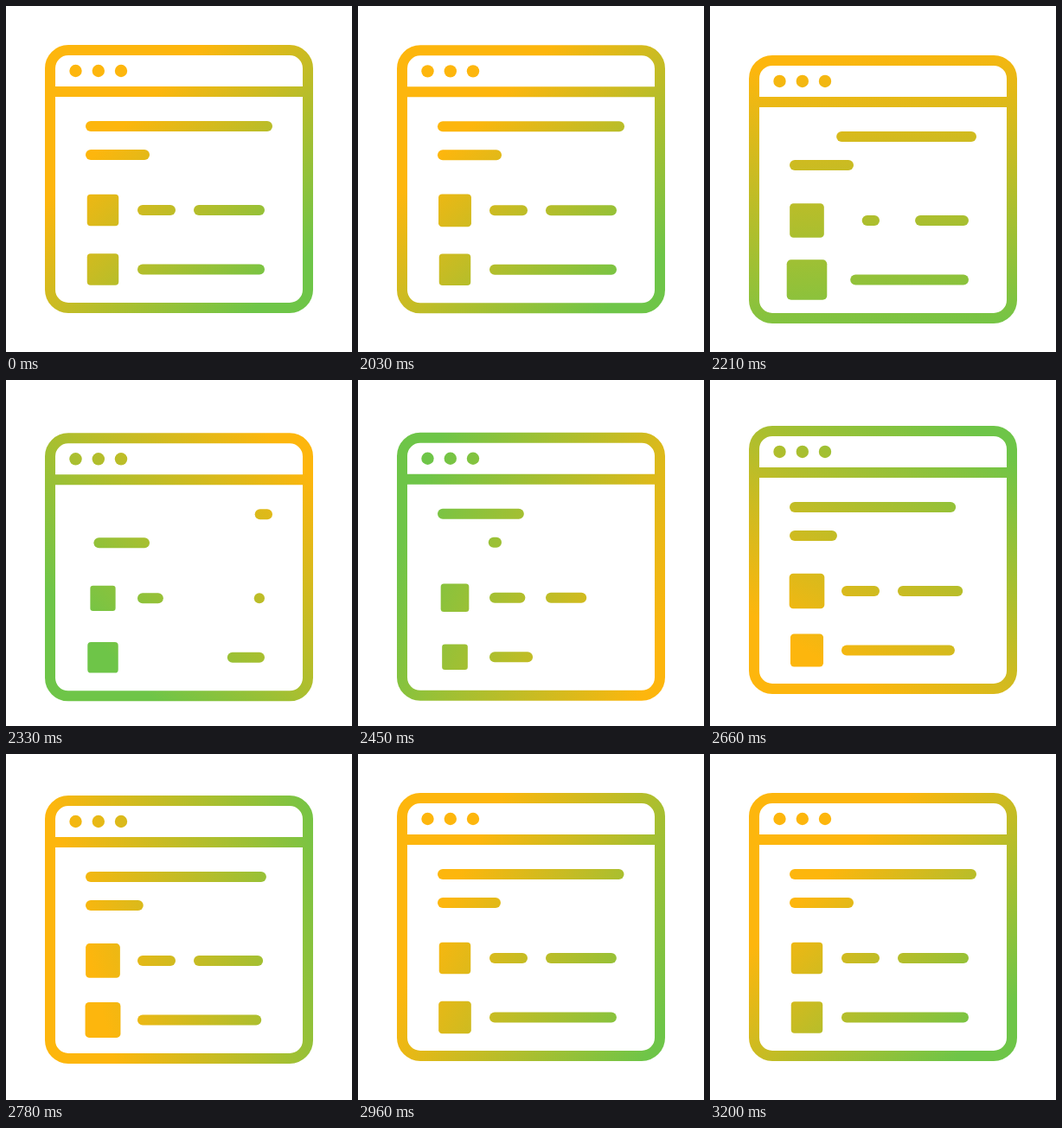
An HTML page for the animation above (3.23 s loop, 400 by 400 pixels).

```html
<!DOCTYPE html>
<html lang="en">
<head>
<meta charset="utf-8">
<title>Page layout icon</title>
<style>
html, body { margin: 0; width: 100%; height: 100%; overflow: hidden; background: #fff; }
svg { display: block; width: 100vw; height: 100vh; }
</style>
</head>
<body>
<svg viewBox="0 0 400 400">
  <defs>
    <linearGradient id="tint" gradientUnits="userSpaceOnUse">
      <stop offset="0" stop-color="#fdb60d"/>
      <stop offset="1" stop-color="#6ec548"/>
    </linearGradient>
  </defs>
  <g id="page" fill="none" stroke="url(#tint)" stroke-width="12">
    <rect x="51" y="51" width="298" height="298" rx="21"/>
    <path d="M51 99H349"/>
    <g id="solid" fill="url(#tint)" stroke="none">
      <circle cx="80.5" cy="75" r="7.2"/>
      <circle cx="106.8" cy="75" r="7.2"/>
      <circle cx="133" cy="75" r="7.2"/>
    </g>
    <g id="lines" stroke-linecap="round"></g>
  </g>
</svg>
<script>
const LOOP = 3230, REST = 2000, STEP = 30;
const $ = id => document.getElementById(id);
const page = $('page'), tint = $('tint');

const clamp = p => Math.min(1, Math.max(0, p));
const smooth = p => p * p * (3 - 2 * p);
const mix = (a, b, p) => a + (b - a) * p;
const easeOut = p => 1 - Math.pow(1 - p, 4.8);

// Cubic bezier easing with y handles at 0 and 1
function ease(p, x1, x2) {
  let lo = 0, hi = 1;
  for (let i = 0; i < 24; i++) {
    const u = (lo + hi) / 2, v = 1 - u;
    if (3 * v * v * u * x1 + 3 * v * u * u * x2 + u * u * u < p) lo = u;
    else hi = u;
  }
  return smooth(lo);
}

// Smooth interpolation through [step, value] pairs
function track(n, keys) {
  if (n <= keys[0][0]) return keys[0][1];
  for (let i = 1; i < keys.length; i++) {
    const [a, from] = keys[i - 1], [b, to] = keys[i];
    if (n < b) return mix(from, to, smooth((n - a) / (b - a)));
  }
  return keys[keys.length - 1][1];
}

function add(parent, tag) {
  const el = document.createElementNS('http://www.w3.org/2000/svg', tag);
  return $(parent).appendChild(el);
}

// Text lines: ends, height, erase start and end, regrow duration
const lines = [
  { x1: 98, x2: 302, y: 139, out: 4.5, back: 11.9, grow: 28 },
  { x1: 98, x2: 160, y: 172, out: 9.4, back: 15.9, grow: 28 },
  { x1: 158, x2: 190, y: 236, out: 4, back: 8.5, grow: 16 },
  { x1: 223, x2: 293, y: 236, out: 4.7, back: 11.2, grow: 28 },
  { x1: 158, x2: 293, y: 304.5, out: 5.7, back: 13.4, grow: 24 }
].map(l => ({ ...l, el: add('lines', 'path') }));

const squares = [
  { y: 236, delay: 0 },
  { y: 304.5, delay: 3 }
].map(s => ({ ...s, el: add('solid', 'rect') }));

const LIFT = 16.6;
const POP = [[0, 1], [4.3, 1.28], [10.5, 0.8], [23, 1.12], [32, 1]];
const SHIFT = [[0, 39], [7, 15], [11, -27], [18, 0], [26, 46], [40, 39]];
const SPAN = [[0, 258], [7, 345], [11, 310], [18, 328], [26, 310], [40, 258]];

function drawTint(n) {
  const angle = (45 + 360 * ease(clamp(n / 40), 0.32, 0.45)) * Math.PI / 180;
  const dx = Math.cos(angle), dy = Math.sin(angle);
  const mid = track(n, SHIFT), half = track(n, SPAN) / 2;
  [mid - half, mid + half].forEach((d, i) => {
    tint.setAttribute('x' + (i + 1), 200 + dx * d);
    tint.setAttribute('y' + (i + 1), 200 + dy * d);
  });
}

function drawLine(l, n) {
  const cut = smooth(clamp((n - l.out) / (l.back - l.out)));
  const left = n < l.back ? mix(l.x1, l.x2, cut) : l.x1;
  const right = n < l.back ? l.x2
    : mix(l.x1, l.x2, easeOut(clamp((n - l.back) / l.grow)));
  l.el.setAttribute('d', right - left > 0.1 ? `M${left} ${l.y}H${right}` : '');
}

function drawSquare(s, n) {
  const k = track(n - s.delay, POP), size = 36.5 * k;
  const box = { x: 112 - size / 2, y: s.y - size / 2, width: size, height: size, rx: 4 * k };
  for (const name in box) s.el.setAttribute(name, box[name]);
}

function draw(ms) {
  const n = Math.max(0, Math.floor((ms % LOOP - REST) / STEP));
  const y = n < 12.5
    ? LIFT * ease(n / 12.5, 0.333, 0.46)
    : LIFT * (1 - smooth(clamp((n - 12.5) / 18.5)));
  page.setAttribute('transform', `translate(0 ${y})`);
  drawTint(n);
  lines.forEach(l => drawLine(l, n));
  squares.forEach(s => drawSquare(s, n));
}

let start;
function tick(now) {
  if (start === undefined) start = now;
  draw(now - start);
  requestAnimationFrame(tick);
}
draw(0);
requestAnimationFrame(tick);
</script>
</body>
</html>
```
